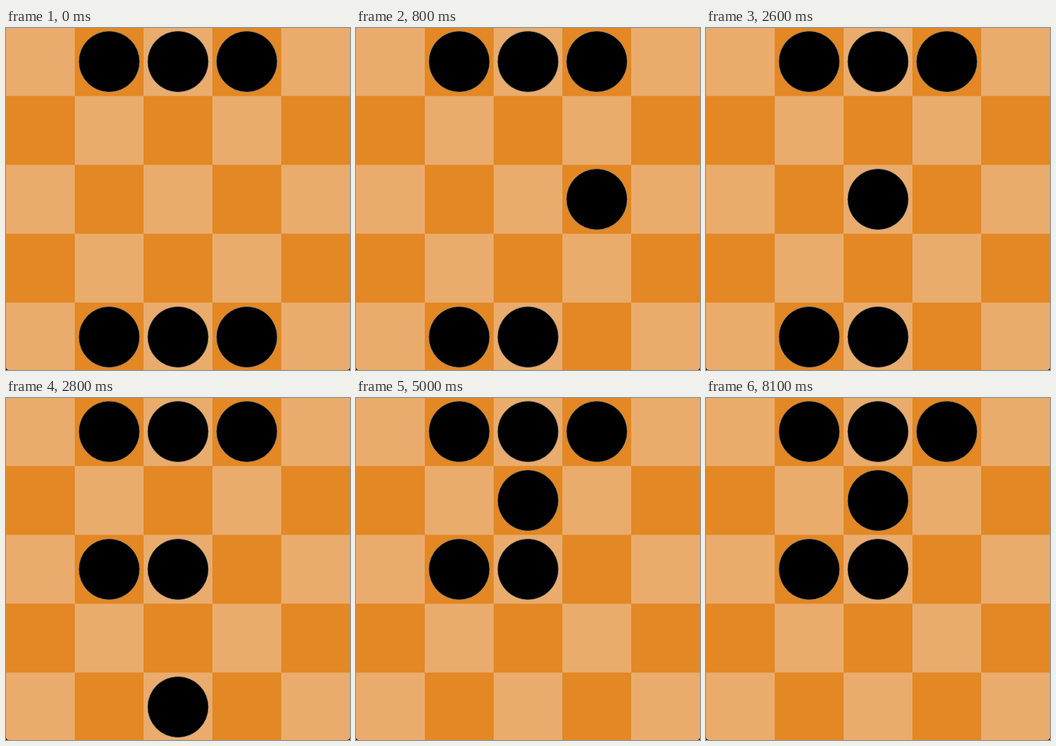
These frames come from a looping animation (600x596 px, 8500 ms). An HTML page:

```html
<!DOCTYPE html>
<html lang="en">
<head>
<meta charset="utf-8">
<title>Sliding discs</title>
<style>
  html, body { margin: 0; width: 100%; height: 100%; overflow: hidden; background: #111; }
  svg { display: block; width: 600px; height: 596px; border-radius: 0 0 5px 5px; background: #e9ac6d; }
  path { fill: #e38824; }
  circle { stroke: #777; stroke-width: 1; }
</style>
</head>
<body>
<svg viewBox="0 1.5 600 596"></svg>
<script>
const LOOP = 8500, CELL = 120;
const svg = document.querySelector('svg');

function add(tag, attrs) {
  const el = document.createElementNS('http://www.w3.org/2000/svg', tag);
  for (const key in attrs) el.setAttribute(key, attrs[key]);
  return svg.appendChild(el);
}

let squares = '';
for (let i = 1; i < 25; i += 2)
  squares += `M${i % 5 * CELL} ${Math.floor(i / 5) * CELL}h${CELL}v${CELL}h-${CELL}z`;
add('path', { d: squares });

// Starting cells as [column, row]
const start = [[1, 0], [2, 0], [3, 0], [1, 4], [2, 4], [3, 4]];
const moves = [
  { at: 800, disc: 5, to: [3, 2] },
  { at: 1800, disc: 5, to: [2, 2] },
  { at: 2800, disc: 3, to: [1, 2] },
  { at: 3800, disc: 4, to: [2, 1] }
];
const discs = start.map(() => add('circle', { r: 53 }));

function draw(time) {
  const t = time % LOOP;
  const cells = [...start];
  for (const { at, disc, to } of moves) if (t >= at) cells[disc] = to;
  cells.forEach(([col, row], i) => {
    discs[i].setAttribute('cx', (col + 0.5) * CELL);
    discs[i].setAttribute('cy', (row + 0.5) * CELL);
  });
}

const begin = performance.now();
function tick() {
  draw(performance.now() - begin);
  requestAnimationFrame(tick);
}
tick();
</script>
</body>
</html>
```
